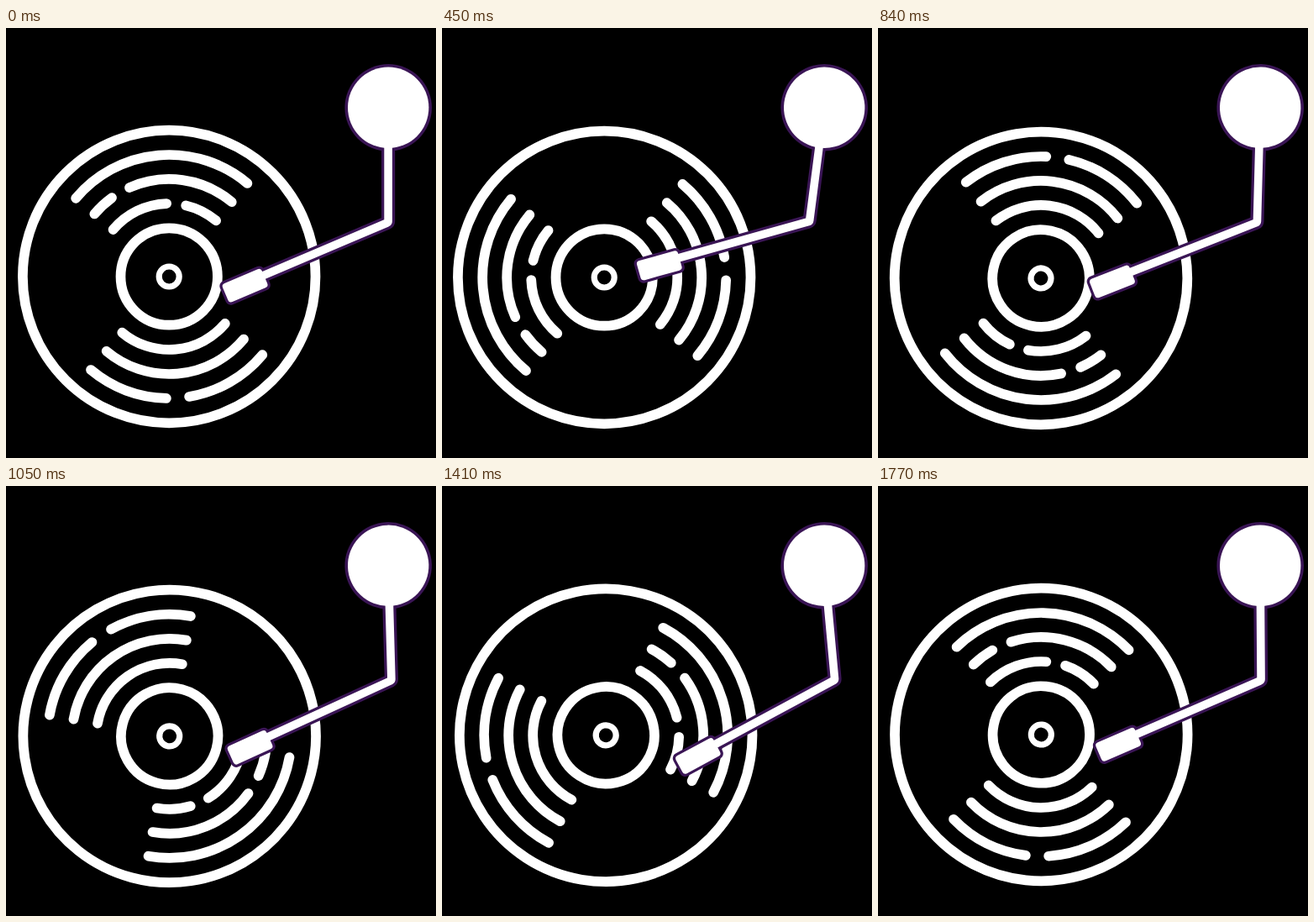
These frames come from a looping animation (512 by 512 pixels, 1800 ms). An HTML page:

```html
<!DOCTYPE html>
<html lang="en">
<head>
<meta charset="utf-8">
<title>Turntable</title>
<style>
  html, body { margin: 0; width: 100%; height: 100%; overflow: hidden; background: #000; }
  svg { display: block; width: 100%; height: 100%; }
  #disc { fill: none; stroke: #fff; stroke-width: 11.7; stroke-linecap: round; }
  .edge { fill: #3a1555; stroke: #3a1555; }
  .face { fill: #fff; stroke: #fff; }
  .rod { fill: none; stroke-linejoin: round; }
</style>
</head>
<body>
<svg viewBox="0 0 512 512">
  <g id="disc">
    <circle cx="194.2" cy="296" r="174.3"/>
    <circle cx="194.2" cy="296" r="57.7"/>
    <circle cx="194.2" cy="296" r="12" stroke-width="7.2"/>
    <path id="grooves"/>
  </g>
  <g id="arm">
    <g class="edge">
      <circle cx="455.2" cy="94.8" r="51.8" stroke="none"/>
      <path class="rod" d="M455.1 120V230Q455.1 231.4 453.8 232L300 297.3" stroke-width="16.2"/>
      <rect x="-28.6" y="-15.2" width="57.2" height="30.4" rx="6.5" stroke="none" transform="translate(284.6 306.6) rotate(-23)"/>
    </g>
    <g class="face">
      <circle cx="455.2" cy="94.8" r="48.2" stroke="none"/>
      <path class="rod" d="M455.1 120V230Q455.1 231.4 453.8 232L300 297.3" stroke-width="9.6"/>
      <rect x="-25.4" y="-12" width="50.8" height="24" rx="4" stroke="none" transform="translate(284.6 306.6) rotate(-23)"/>
    </g>
  </g>
</svg>
<script>
  const LOOP = 1800, STEP = 30;
  const disc = document.getElementById('disc');
  const arm = document.getElementById('arm');

  // radius, start and end in degrees clockwise from the top
  const grooves = [
    [145, -50, 40],
    [116, -50, -36], [116, -24, 40],
    [87, -50, -2], [87, 13.3, 40],
    [87, 130, 220],
    [116, 130, 220],
    [145, 130, 170.5], [145, 181.3, 220]
  ];

  // time in ms, tonearm angle in degrees
  const swing = [[0, 0], [450, 7.4], [1350, -6.1], [LOOP, 0]];

  function point(r, deg) {
    const a = deg * Math.PI / 180;
    return (194.2 + r * Math.sin(a)).toFixed(2) + ' ' + (296 - r * Math.cos(a)).toFixed(2);
  }

  function swingAt(t) {
    const i = swing.findIndex(([end]) => end > t);
    const [t0, a0] = swing[i - 1], [t1, a1] = swing[i];
    return a0 + (a1 - a0) * (t - t0) / (t1 - t0);
  }

  document.getElementById('grooves').setAttribute('d', grooves.map(
    ([r, from, to]) => `M${point(r, from)}A${r} ${r} 0 0 1 ${point(r, to)}`).join(''));

  function draw(elapsed) {
    const t = Math.floor((elapsed + 1) / STEP) * STEP % LOOP;
    // the spindle sits just below the disc's centre, so the disc wobbles
    disc.setAttribute('transform', `rotate(${-360 * t / LOOP} 194.2 297)`);
    arm.setAttribute('transform', `rotate(${swingAt(t)} 455.5 95)`);
  }

  const start = performance.now();
  function tick() {
    draw(Math.max(0, performance.now() - start));
    requestAnimationFrame(tick);
  }
  tick();
</script>
</body>
</html>
```
